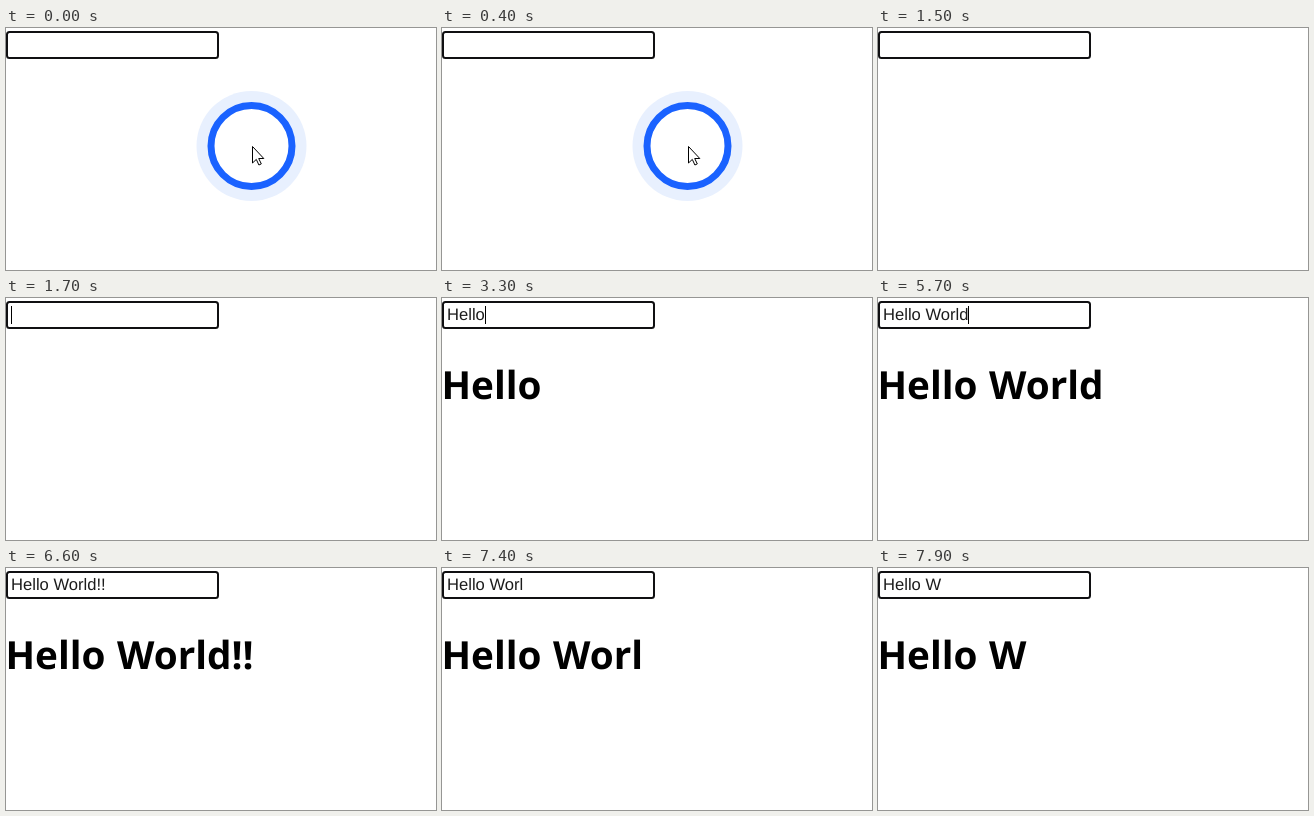
An HTML page that plays this animation: 430 by 242 pixels, repeating every 8 s.

```html
<!DOCTYPE html>
<html lang="en">
<head>
<meta charset="utf-8">
<title>Live heading</title>
<style>
  html, body { margin: 0; width: 100%; height: 100%; overflow: hidden; background: #fff; }
  svg { display: block; }
  text { text-rendering: geometricPrecision; }
  #typed { font: 16.6px "Liberation Sans", Arial, sans-serif; fill: #1c1c1c; }
  #heading { font: 700 38.7px "Open Sans", "Noto Sans", sans-serif; word-spacing: 1.5px; }
</style>
</head>
<body>
<svg width="430" height="242" viewBox="0 0 430 242">
  <rect x="1" y="4" width="211" height="26" rx="2.5" fill="#fff" stroke="#101012" stroke-width="2"/>
  <text id="typed" x="5" y="22"></text>
  <rect id="caret" y="8" width="1" height="18"/>
  <text id="heading" x="-0.5" y="101"></text>
  <g id="ring">
    <circle cx="245.5" cy="118" r="55" fill="#e8f0fe"/>
    <circle cx="245.5" cy="118" r="40.5" fill="#fff" stroke="#1a62ff" stroke-width="7"/>
    <path d="M246.5 118.5v16.5l3.8-3.6 2.6 5.6 2.4-1.1-2.6-5.4h5.1z" fill="#fff" stroke="#000"/>
  </g>
</svg>
<script>
  const LOOP = 8000;
  // [start in ms, text, caret shown]
  const steps = [
    [0, "", false],
    [1700, "", true],
    [3300, "Hello", true],
    [4600, "Hello Wor", true],
    [5700, "Hello World", true],
    [6600, "Hello World!!", false],
    [7300, "Hello Worl", false],
    [7800, "Hello W", false],
  ];
  const [typed, heading, caret, ring] =
    ["typed", "heading", "caret", "ring"].map(id => document.getElementById(id));
  const show = (el, on) => el.setAttribute("visibility", on ? "visible" : "hidden");

  function draw(t) {
    const [, text, caretOn] = steps.findLast(([start]) => start <= t);
    typed.textContent = heading.textContent = text;
    const end = text ? typed.getComputedTextLength() : 0;
    caret.setAttribute("x", Math.round(5 + end));
    show(caret, caretOn);
    show(ring, t < 1500);
  }

  function tick() {
    draw(performance.now() % LOOP);
    requestAnimationFrame(tick);
  }
  tick();
</script>
</body>
</html>
```
